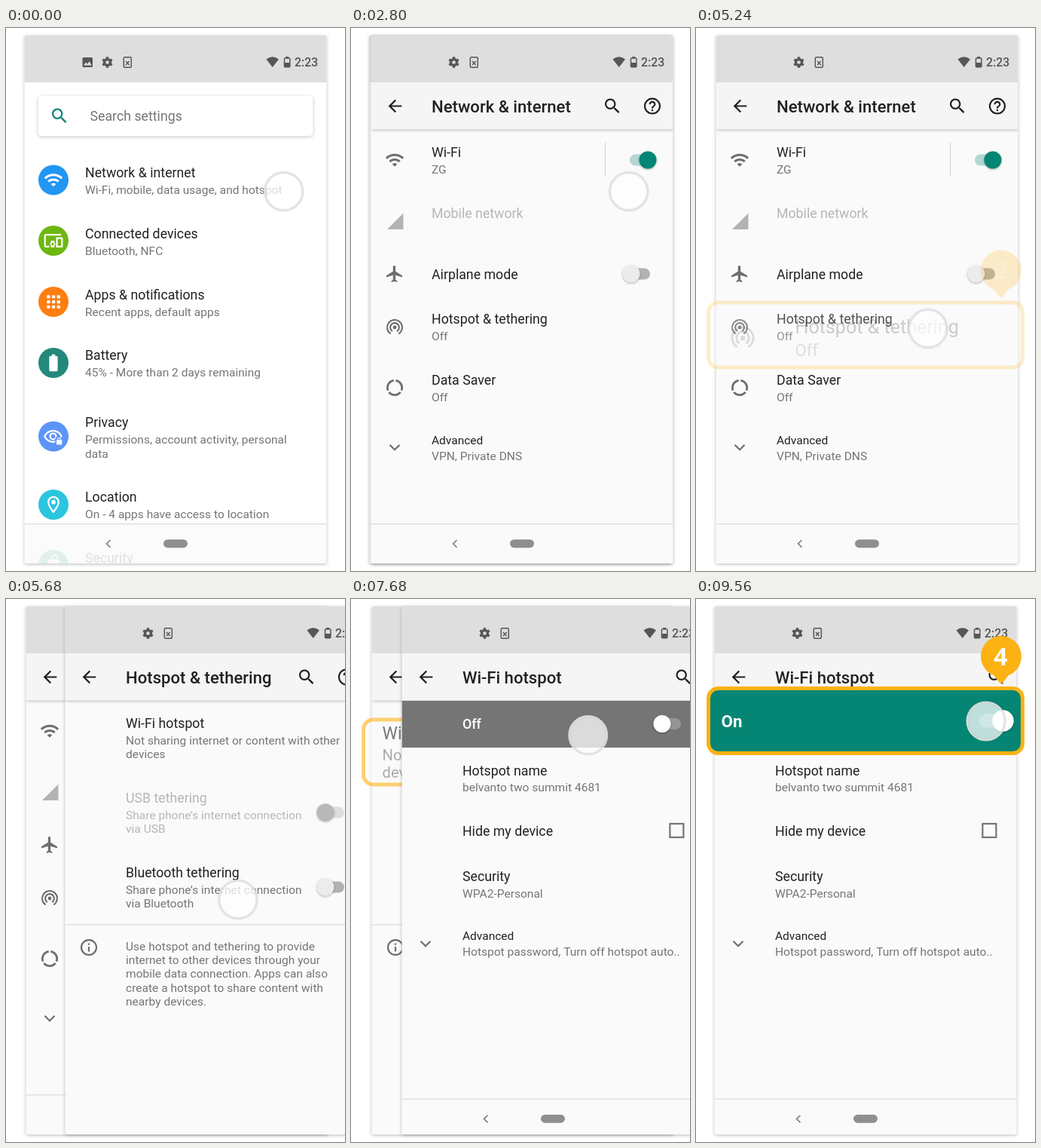
An HTML page with a canvas for the animation above (9.6 s loop, 450 by 720 pixels).

```html
<!DOCTYPE html>
<html lang="en">
<head>
<meta charset="utf-8">
<title>Wi-Fi hotspot walkthrough</title>
<style>
html, body { margin: 0; width: 100%; height: 100%; overflow: hidden; background: #fff; }
canvas { display: block; width: 450px; height: 720px; }
</style>
</head>
<body>
<canvas id="stage"></canvas>
<script>
const canvas = document.getElementById('stage');
const dpr = window.devicePixelRatio || 1;
canvas.width = 450 * dpr;
canvas.height = 720 * dpr;
const c = canvas.getContext('2d');

const LOOP = 9600;
const INK = '#212121', GREY = '#757575', PALE = '#b6b6b6', STATUS = '#565656';
const TEAL = '#058573', AMBER = '#fdb213', LINE = '#dcdcdc';

const ICONS = {
  search: 'M15.5 14h-.79l-.28-.27C15.41 12.59 16 11.11 16 9.5 16 5.91 13.09 3 9.5 3S3 5.91 3 9.5 5.91 16 9.5 16c1.61 0 3.09-.59 4.23-1.57l.27.28v.79l5 4.99L20.49 19l-4.99-5zm-6 0C7.01 14 5 11.99 5 9.5S7.01 5 9.5 5 14 7.01 14 9.5 11.99 14 9.5 14z',
  back: 'M20 11H7.83l5.59-5.59L12 4l-8 8 8 8 1.41-1.41L7.83 13H20v-2z',
  help: 'M11 18h2v-2h-2v2zm1-16C6.48 2 2 6.48 2 12s4.48 10 10 10 10-4.48 10-10S17.52 2 12 2zm0 18c-4.41 0-8-3.59-8-8s3.59-8 8-8 8 3.59 8 8-3.59 8-8 8zm0-14c-2.21 0-4 1.79-4 4h2c0-1.1.9-2 2-2s2 .9 2 2c0 2-3 1.75-3 5h2c0-2.25 3-2.5 3-5 0-2.21-1.79-4-4-4z',
  info: 'M11 7h2v2h-2zM11 11h2v6h-2zM12 2a10 10 0 1 0 0 20 10 10 0 1 0 0-20zM12 4a8 8 0 1 0 0 16 8 8 0 1 0 0-16z',
  wifi: 'M1 9l2 2c4.97-4.97 13.03-4.97 18 0l2-2C16.93 2.93 7.08 2.93 1 9zm8 8l3 3 3-3c-1.65-1.66-4.34-1.66-6 0zm-4-4l2 2c2.76-2.76 7.24-2.76 10 0l2-2C15.14 9.14 8.87 9.14 5 13z',
  plane: 'M21 16v-2l-8-5V3.5c0-.83-.67-1.5-1.5-1.5S10 2.67 10 3.5V9l-8 5v2l8-2.5V19l-2 1.5V22l3.5-1 3.5 1v-1.5L13 19v-5.5l8 2.5z',
  devices: 'M3 6h18V4H3c-1.1 0-2 .9-2 2v12c0 1.1.9 2 2 2h4v-2H3V6zm10 6H9v1.78c-.61.55-1 1.33-1 2.22s.39 1.67 1 2.22V20h4v-1.78c.61-.55 1-1.34 1-2.22s-.39-1.67-1-2.22V12zm-2 5.5c-.83 0-1.5-.67-1.5-1.5s.67-1.5 1.5-1.5 1.5.67 1.5 1.5-.67 1.5-1.5 1.5zM22 8h-6c-.5 0-1 .5-1 1v10c0 .5.5 1 1 1h6c.5 0 1-.5 1-1V9c0-.5-.5-1-1-1zm-1 10h-4v-8h4v8z',
  battery: 'M15.67 4H14V2h-4v2H8.33C7.6 4 7 4.6 7 5.33v15.33C7 21.4 7.6 22 8.33 22h7.33c.74 0 1.34-.6 1.34-1.33V5.33C17 4.6 16.4 4 15.67 4z',
  eye: 'M12 4C7 4 2.73 7.11 1 11.5 2.73 15.89 7 19 12 19s9.27-3.11 11-7.5C21.27 7.11 17 4 12 4zM12 6c3.79 0 7.17 2.13 8.82 5.5C19.17 14.87 15.79 17 12 17s-7.17-2.13-8.82-5.5C4.83 8.13 8.21 6 12 6zM12 7a4.5 4.5 0 1 0 0 9 4.5 4.5 0 1 0 0-9zM12 9a2.5 2.5 0 1 0 0 5 2.5 2.5 0 1 0 0-5z',
  place: 'M12 2C8.13 2 5 5.13 5 9c0 5.25 7 13 7 13s7-7.75 7-13c0-3.87-3.13-7-7-7zM7 9c0-2.76 2.24-5 5-5s5 2.24 5 5c0 2.88-2.88 7.19-5 9.88C9.92 16.21 7 11.85 7 9zM12 6.5a2.5 2.5 0 1 0 0 5 2.5 2.5 0 1 0 0-5z'
};
for (const k in ICONS) ICONS[k] = new Path2D(ICONS[k]);

const clamp = v => Math.max(0, Math.min(1, v));
const span = (t, a, b) => clamp((t - a) / (b - a));
const lerp = (a, b, p) => a + (b - a) * p;
const smooth = p => p < 0.5 ? 4 * p ** 3 : 1 - 4 * (1 - p) ** 3;
const easeOut = p => 1 - (1 - p) ** 3.3;

function icon(name, x, y, color, size = 26.6) {
  c.save();
  c.translate(x, y);
  c.scale(size / 24, size / 24);
  c.translate(-12, -12);
  c.fillStyle = color;
  c.fill(ICONS[name], 'evenodd');
  c.restore();
}

function text(str, x, y, size, color, weight = 400, family = 'Roboto') {
  c.font = `${weight} ${size}px "${family}", sans-serif`;
  c.fillStyle = color;
  c.fillText(str, x, y);
}
const title = (s, y, color = INK) => text(s, 105, y, 17.75, color);
const sub = (s, y, color = GREY) => text(s, 105, y, 15.55, color);
const lines = (arr, y, color) => arr.forEach((s, i) => sub(s, y + i * 18.2, color));

function rect(x, y, w, h, color) {
  c.fillStyle = color;
  c.fillRect(x, y, w, h);
}
function round(x, y, w, h, r, color) {
  c.beginPath();
  c.roundRect(x, y, w, h, r);
  c.fillStyle = color;
  c.fill();
}
function disc(x, y, r, color) {
  c.beginPath();
  c.arc(x, y, r, 0, 7);
  c.fillStyle = color;
  c.fill();
}
function arc(x, y, r, from, to, width, color) {
  c.beginPath();
  c.arc(x, y, r, from * Math.PI / 180, to * Math.PI / 180);
  c.lineWidth = width;
  c.strokeStyle = color;
  c.stroke();
}
function poly(points, width, color) {
  c.beginPath();
  points.forEach(([x, y]) => c.lineTo(x, y));
  c.lineWidth = width;
  c.strokeStyle = color;
  c.stroke();
}
function shadowed(blur, alpha, draw, dy = 1) {
  c.save();
  c.shadowColor = `rgba(0,0,0,${alpha})`;
  c.shadowBlur = blur * dpr;
  c.shadowOffsetY = dy * dpr;
  draw();
  c.restore();
}
function faded(alpha, draw) {
  if (alpha <= 0) return;
  c.save();
  c.globalAlpha *= alpha;
  draw();
  c.restore();
}

function toggle(x, y, thumb, track) {
  round(x - 5, y - 7.5, 30, 15, 7.5, track);
  shadowed(3, 0.3, () => disc(x, y, 11.5, thumb));
}
function chevron(x, y) {
  poly([[x - 6.5, y - 3.2], [x, y + 3.3], [x + 6.5, y - 3.2]], 2.2, '#6e6e6e');
}
function hotspot(x, y, k) {
  disc(x, y, 2.4 * k, '#6e6e6e');
  arc(x, y, 5.9 * k, 122, 418, 2.1 * k, '#6e6e6e');
  arc(x, y, 10 * k, 122, 418, 2.1 * k, '#6e6e6e');
}

function statusBar(withImage) {
  rect(24.5, 10, 401, 62, '#dedede');
  if (withImage) {
    round(101.5, 39, 13.5, 13, 1.5, STATUS);
    c.beginPath();
    c.moveTo(103, 49.5); c.lineTo(106, 45.5); c.lineTo(108, 47.8);
    c.lineTo(110.5, 44.3); c.lineTo(113.8, 49.5);
    c.fillStyle = '#dedede';
    c.fill();
  }
  arc(134.5, 45.5, 4, 0, 360, 3.4, STATUS);
  for (let i = 0; i < 6; i++) {
    const a = i * Math.PI / 3 + Math.PI / 6, dx = Math.cos(a), dy = Math.sin(a);
    poly([[134.5 + dx * 4.5, 45.5 + dy * 4.5], [134.5 + dx * 7.2, 45.5 + dy * 7.2]], 3.4, STATUS);
  }
  c.beginPath();
  c.roundRect(156.3, 38.8, 10, 13.4, 1.5);
  c.lineWidth = 1.5;
  c.stroke();
  poly([[159, 44], [163.6, 49]], 1.4, STATUS);
  poly([[163.6, 44], [159, 49]], 1.4, STATUS);
  c.beginPath();
  c.moveTo(345.5, 41.5);
  c.quadraticCurveTo(353.8, 35, 362, 41.5);
  c.lineTo(353.8, 52);
  c.fillStyle = STATUS;
  c.fill();
  rect(371.2, 38, 4, 2, STATUS);
  c.beginPath();
  c.roundRect(369.5, 40, 7.4, 11.8, 1);
  c.lineWidth = 1.5;
  c.strokeStyle = STATUS;
  c.stroke();
  rect(369.5, 46, 7.4, 6, STATUS);
  text('2:23', 383, 51, 15.8, STATUS, 500);
}

function header(label, hasHelp) {
  shadowed(3, 0.22, () => rect(24.5, 72, 401, 62.5, '#f5f5f5'));
  statusBar(false);
  icon('back', 56.5, 103.5, INK);
  text(label, 105, 111.5, 22.1, INK, 500);
  icon('search', hasHelp ? 345 : 398.5, 103.5, INK);
  if (hasHelp) icon('help', 398, 103.5, INK);
}

function navBar(y, fill) {
  rect(24.5, y, 401, 710 - y, fill);
  rect(24.5, y - 0.6, 401, 1.3, LINE);
  poly([[138.5, y + 21.5], [133.5, y + 26.3], [138.5, y + 31.1]], 1.7, '#808080');
  round(209, y + 20.7, 32, 11, 5.5, '#8f8f8f');
}

function drawSettings() {
  shadowed(4, 0.25, () => round(42.5, 90, 365, 53.5, 5, '#fff'));
  statusBar(true);
  icon('search', 71, 116.5, TEAL);
  text('Search settings', 111.5, 123.3, 17.75, GREY);
  const rows = [
    [201.5, '#2196f3', 198, 'Network & internet', ['Wi-Fi, mobile, data usage, and hotspot']],
    [282, '#6fb611', 278.7, 'Connected devices', ['Bluetooth, NFC']],
    [363, '#ff7e10', 359.5, 'Apps & notifications', ['Recent apps, default apps']],
    [444, '#23897c', 440.3, 'Battery', ['45% - More than 2 days remaining']],
    [541.5, '#5c94f8', 529.3, 'Privacy', ['Permissions, account activity, personal', 'data']],
    [632, '#2bc5de', 628, 'Location', ['On - 4 apps have access to location']],
    [712, '#17a673', 709, 'Security', []]
  ];
  for (const [cy, color, ty, name, desc] of rows) {
    disc(63, cy, 20, color);
    title(name, ty);
    lines(desc, ty + 22);
  }
  icon('wifi', 63, 201.5, '#fff');
  icon('devices', 63, 282, '#fff', 27);
  for (let i = 0; i < 9; i++)
    round(54.2 + i % 3 * 6.7, 354.3 + Math.floor(i / 3) * 6.7, 4.3, 4.3, 1.4, '#fff');
  icon('battery', 63, 444, '#fff', 27);
  icon('eye', 62.5, 542, '#fff', 27);
  round(65.5, 542.5, 10.5, 12, 1, '#5c94f8');
  arc(70.6, 545.6, 2, 180, 360, 1.3, '#fff');
  round(67, 546, 7.4, 6.4, 1, '#fff');
  icon('place', 63, 632, '#fff', 27);
  arc(64.5, 703, 4, 180, 360, 2, '#fff');
  round(55, 704.5, 16, 12, 2, '#fff');
  navBar(657.5, 'rgba(251,251,251,.88)');
}

function drawNetwork() {
  header('Network & internet', true);
  icon('wifi', 56, 175, '#6e6e6e');
  title('Wi-Fi', 171.3);
  sub('ZG', 193);
  rect(335, 152, 1.2, 45, '#d4d4d4');
  round(368, 167.5, 32, 15, 7.5, '#b3d8d3');
  shadowed(3, 0.3, () => disc(392, 175, 11.5, TEAL));
  c.beginPath();
  c.moveTo(67.5, 245.5); c.lineTo(67.5, 267); c.lineTo(46, 267);
  c.fillStyle = '#b3b3b3';
  c.fill();
  title('Mobile network', 251.8, PALE);
  icon('plane', 56, 326, '#6e6e6e');
  title('Airplane mode', 332.7);
  toggle(370, 326, '#ececec', '#b2b2b2');
  hotspot(56, 397, 1);
  title('Hotspot & tethering', 392.3);
  sub('Off', 414);
  for (const a of [-82, 38, 158]) arc(56, 477, 9.7, a, a + 104, 2.8, '#6e6e6e');
  title('Data Saver', 473.2);
  sub('Off', 495);
  chevron(56, 556);
  text('Advanced', 105, 551.6, 15.5, INK);
  sub('VPN, Private DNS', 572.7);
  navBar(657.5, '#fafafa');
}

function drawTethering() {
  header('Hotspot & tethering', true);
  title('Wi-Fi hotspot', 171.3);
  lines(['Not sharing internet or content with other', 'devices'], 193.2);
  title('USB tethering', 270.3, PALE);
  lines(['Share phone’s internet connection', 'via USB'], 292, PALE);
  toggle(370, 283, '#b8b8b8', '#dedede');
  title('Bluetooth tethering', 369.2);
  lines(['Share phone’s internet connection', 'via Bluetooth'], 391);
  toggle(370, 382, '#ececec', '#b2b2b2');
  rect(24.5, 431.2, 401, 1.3, LINE);
  icon('info', 56, 462, '#6e6e6e');
  lines([
    'Use hotspot and tethering to provide',
    'internet to other devices through your',
    'mobile data connection. Apps can also',
    'create a hotspot to share content with',
    'nearby devices.'
  ], 466);
}

function drawHotspot() {
  header('Wi-Fi hotspot', false);
  rect(24.5, 135, 401, 62, '#757575');
  text('Off', 105, 172, 17.75, '#fff', 500);
  toggle(370, 165.5, '#fff', '#959595');
  title('Hotspot name', 233.5);
  sub('belvanto two summit 4681', 255.3);
  title('Hide my device', 314.3);
  c.strokeStyle = GREY;
  c.lineWidth = 2.2;
  c.strokeRect(380.4, 298, 18, 18);
  title('Security', 374.2);
  sub('WPA2-Personal', 396);
  chevron(56, 457);
  text('Advanced', 105, 452.4, 15.5, INK);
  sub('Hotspot password, Turn off hotspot auto..', 473.4);
  navBar(663, '#fafafa');
}

function screen(x, bg, draw) {
  c.save();
  c.translate(x, 0);
  shadowed(4, 0.28, () => round(24.5, 10, 401, 700, 2, bg));
  c.beginPath();
  c.roundRect(24.5, 10, 401, 700, 2);
  c.clip();
  draw();
  c.restore();
}

// Framed callout with a numbered pin above its right end.
function callout(n, y, fill, draw) {
  c.beginPath();
  c.roundRect(16.5, y + 2.5, 417, 86, 13);
  c.fillStyle = fill;
  c.fill();
  c.lineWidth = 5;
  c.strokeStyle = AMBER;
  c.stroke();
  draw();
  const cy = y - 40;
  c.beginPath();
  c.arc(405, cy, 27, Math.PI * 0.62, Math.PI * 2.38);
  c.lineTo(407, cy + 35);
  c.quadraticCurveTo(405, cy + 37, 403, cy + 35);
  c.fillStyle = AMBER;
  c.fill();
  c.textAlign = 'center';
  text(n, 404.5, cy + 11.5, 32, '#fff', 700, 'Open Sans');
  c.textAlign = 'left';
}

function calloutNetwork() {
  disc(53, 218, 24, '#2196f3');
  icon('wifi', 53, 218, '#fff', 31.5);
  text('Network & internet', 103.5, 213.5, 21.1, INK);
  text('Wi-Fi, mobile, data usage, and hotspot', 103.5, 239.2, 18.4, GREY);
}
function calloutTether() {
  hotspot(62, 411, 1.4);
  text('Hotspot & tethering', 131.5, 405, 25.1, INK);
  text('Off', 131.5, 435.3, 22, GREY);
}
function calloutWifi() {
  text('Wi-Fi hotspot', 41.5, 186, 23, INK);
  text('Not sharing internet or content with other', 41.5, 213.5, 20.2, GREY);
  text('devices', 41.5, 237.2, 20.2, GREY);
}
function calloutSwitch(on) {
  faded(1 - on, () => text('Off', 33.5, 170, 22.3, '#fff', 700));
  faded(on, () => text('On', 33.5, 170, 22.3, '#fff', 700));
  round(376, 152.5, 38, 18, 9, 'rgba(255,255,255,.28)');
  shadowed(3, 0.25, () => disc(lerp(384, 407.5, on), 161.5, 14.3, '#fff'));
}

function cursor(t) {
  let x = 368.7, y = 216.7;
  for (const [start, px, py] of [[2920, 308, 398.5], [5880, 314.7, 180.5], [7760, 385, 162]]) {
    const p = smooth(span(t, start, start + 640));
    x = lerp(x, px, p);
    y = lerp(y, py, p);
  }
  disc(x, y, 24.5, 'rgba(255,255,255,.74)');
  for (const start of [1000, 3640, 6640, 8600]) {
    const press = Math.sin(Math.PI * span(t, start, start + 560));
    if (press > 0.001) disc(x, y, 23.5, `rgba(130,130,130,${0.3 * press})`);
  }
  shadowed(2, 0.12, () => arc(x, y, 25.2, 0, 360, 2.6, 'rgba(226,226,226,.92)'), 0);
}

function slide(t, start, rest) {
  return lerp(427, rest, easeOut(span(t, start, start + 720)));
}
const show = (t, a, b, from, to) => smooth(span(t, a, b)) * (1 - span(t, from, to));

function render(t) {
  c.setTransform(dpr, 0, 0, dpr, 0, 0);
  rect(0, 0, 450, 720, '#fff');
  c.lineJoin = 'miter';

  faded(1 - span(t, 2920, 3240), () => screen(0, '#fff', drawSettings));
  faded(show(t, 400, 720, 2080, 2480), () => callout('1', 174.5, '#fff', calloutNetwork));

  if (t > 2080)
    faded(1 - span(t, 5920, 6240), () => screen(slide(t, 2080, 2), '#fafafa', drawNetwork));
  faded(show(t, 3240, 3600, 4880, 5340), () => callout('2', 361.5, '#fafafa', calloutTether));

  if (t > 5340)
    faded(1 - span(t, 8040, 8320), () => screen(slide(t, 5340, 3), '#fafafa', drawTethering));
  faded(show(t, 6200, 6520, 7480, 7980), () => callout('3', 157.5, '#fafafa', calloutWifi));

  if (t > 7320) screen(slide(t, 7320, 0), '#fafafa', drawHotspot);
  const on = smooth(span(t, 9160, 9560));
  const mix = [[117, 5], [117, 133], [117, 115]].map(([a, b]) => Math.round(lerp(a, b, on)));
  faded(show(t, 8080, 8400, LOOP, LOOP + 1), () =>
    callout('4', 116, `rgb(${mix})`, () => calloutSwitch(on)));

  cursor(t);
}

const begin = performance.now();
function tick() {
  render((performance.now() - begin) % LOOP);
  requestAnimationFrame(tick);
}
tick();
</script>
</body>
</html>
```
